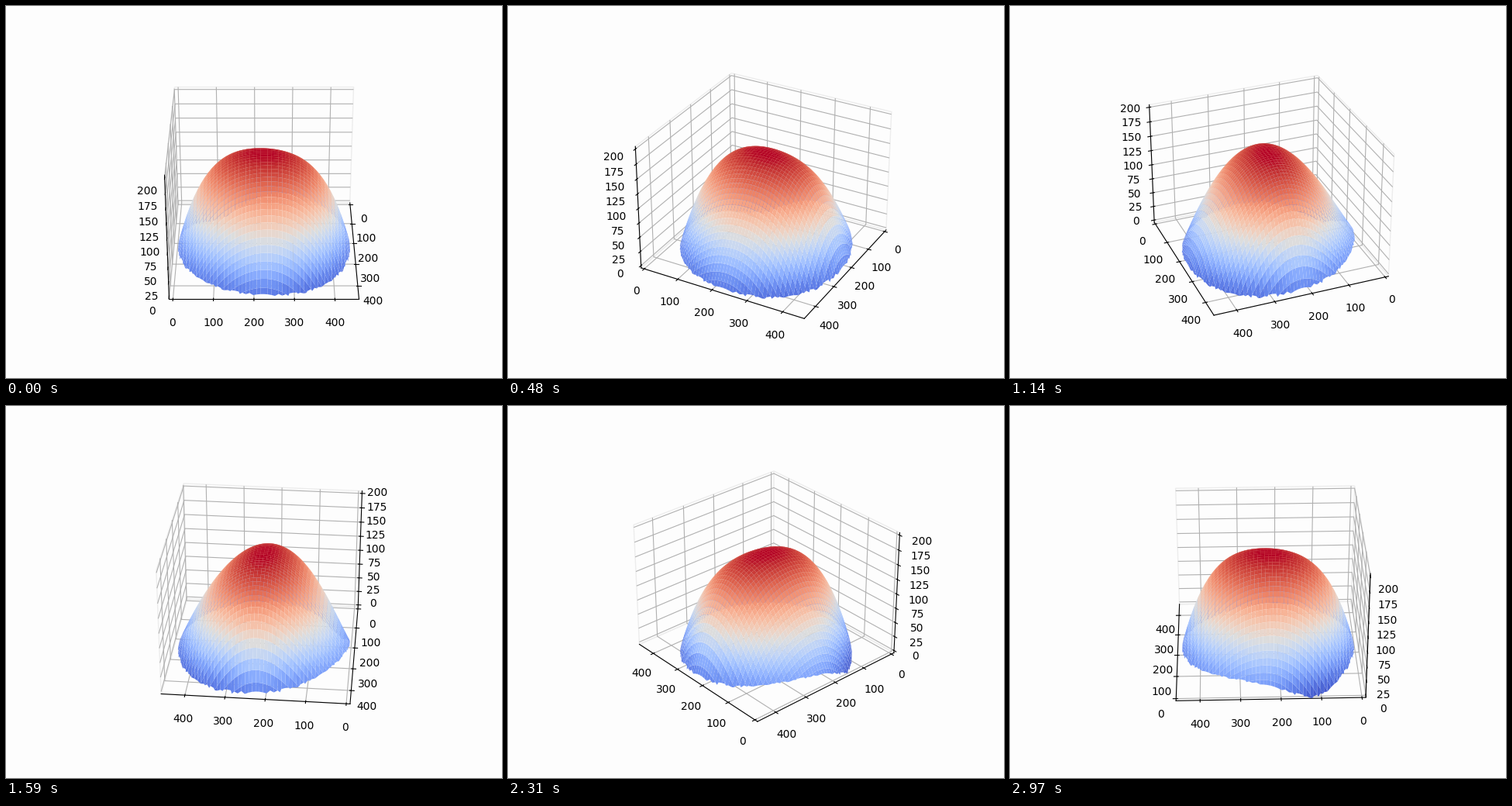
Recreate the animation shown at these times as a matplotlib script. Size 640 by 480 pixels, loop 3 s.

```python
import numpy as np
import matplotlib.pyplot as plt
from matplotlib.animation import FuncAnimation

FRAMES, INTERVAL = 100, 30
SIZE, HEIGHT, STEP = 450, 200, 3
BG = "#fdfdfd"


def bump(angle, center, width):
    d = (angle - center + 180) % 360 - 180
    return np.exp(-0.5 * (d / width) ** 2)


def dome(x, y):
    """Lopsided dome on a disc: steep along one axis, rounder along the other."""
    u, v = 2 * x / SIZE - 1, 2 * y / SIZE - 1
    r2 = u**2 + v**2
    tilt = np.radians(172)
    e = u * np.cos(tilt) + v * np.sin(tilt)
    n = -u * np.sin(tilt) + v * np.cos(tilt)
    drop = (e**2 + 0.35 * n**2) * (1 - r2) + r2**2
    a = np.degrees(np.arctan2(v, u))
    rim = 5 + 22 * bump(a, 160, 30) - 24 * bump(a, 212, 16) - 8 * bump(a, 45, 25)
    z = 164 - 172 * drop + rim * r2**3
    return np.where(r2 < 0.9956, z, np.nan)


def padded(size):
    return -size / 48, size * 49 / 48


fig = plt.figure(figsize=(6.4, 4.8), dpi=100, facecolor=BG)
ax = fig.add_subplot(projection="3d", facecolor=BG)

grid = np.arange(0, SIZE + 1, STEP)
X, Y = np.meshgrid(grid, grid, indexing="ij")
ax.plot_surface(X, Y, dome(X, Y), rstride=3, cstride=3, cmap="coolwarm", linewidth=0)

ax.set(xlim=padded(SIZE), ylim=padded(SIZE), zlim=padded(HEIGHT))
for axis in (ax.xaxis, ax.yaxis, ax.zaxis):
    axis.pane.set(fill=False, alpha=1, edgecolor="#ededed")


def update(i):
    ax.view_init(elev=30, azim=1.8 * i)
    return []


anim = FuncAnimation(fig, update, frames=FRAMES, interval=INTERVAL,
                     init_func=lambda: update(0), repeat=True)
plt.show()
```
